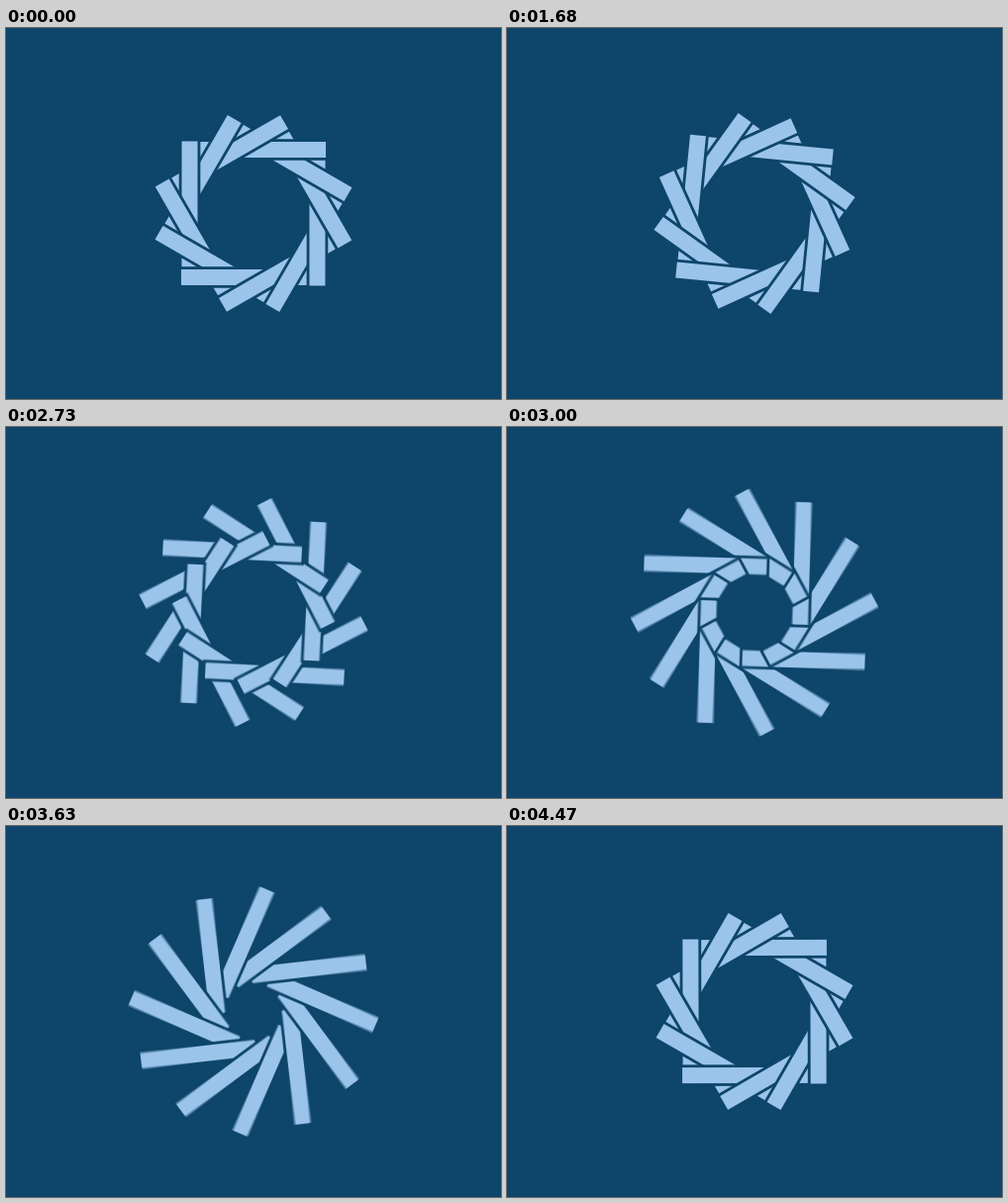
Animation, 500 px wide and 375 px high, one loop 4.5 s. Source, as an HTML page without scripts:

```html
<!DOCTYPE html>
<html lang="en">
<head>
<meta charset="utf-8">
<title>Turning bars</title>
<style>
  @property --drift { syntax: "<angle>"; inherits: true; initial-value: 0deg; }
  @property --flip { syntax: "<number>"; inherits: true; initial-value: 0; }

  html, body { margin: 0; height: 100%; overflow: hidden; background: #0e456b; }
  svg { display: block; width: 500px; height: 375px; }
  .ground { fill: #0e456b; }

  /* Each exposure runs slightly ahead of the previous one; blended, they give motion blur. */
  .exposure {
    opacity: calc(1 / var(--n));
    animation: drift 4.5s linear infinite, flip 4.5s linear infinite;
    animation-delay: calc((1 - var(--n)) * 6ms);
  }
  @keyframes drift { to { --drift: 15deg; } }
  @keyframes flip {
    0% { --flip: 0; }
    50% { --flip: 0; animation-timing-function: cubic-bezier(.33333, 0, .66667, 1); }
    100% { --flip: 1; }
  }

  /* A bar shortens and moves outward as it passes the radial pose. */
  .bar {
    --turn: calc(var(--flip) * 180deg);
    --sin: sin(var(--turn));
    --radial: calc(var(--sin) * var(--sin));
    --half: calc(73px - 20.2px * var(--radial));
    x: calc(-1 * var(--half));
    y: -8px;
    width: calc(2 * var(--half));
    height: 16px;
    fill: #9bc4ea;
    stroke: #0e456b;
    stroke-width: 5.6px;
    paint-order: stroke;
    transform-origin: 0 0;
    transform:
      rotate(calc(var(--k) * 30deg + var(--drift) + var(--flip) * 15deg))
      translateY(calc(-64.5px - 8.2px * var(--radial)))
      rotate(var(--turn));
  }
</style>
</head>
<body>
<svg width="500" height="375">
  <defs>
    <clipPath id="right"><rect y="-188" width="250" height="376"/></clipPath>

    <!-- Cyclic overlap: the stacking order breaks on the left, so only the right half is kept. -->
    <g id="side" clip-path="url(#right)">
      <rect class="bar" style="--k:9"/>
      <rect class="bar" style="--k:8"/>
      <rect class="bar" style="--k:7"/>
      <rect class="bar" style="--k:6"/>
      <rect class="bar" style="--k:5"/>
      <rect class="bar" style="--k:4"/>
      <rect class="bar" style="--k:3"/>
      <rect class="bar" style="--k:2"/>
      <rect class="bar" style="--k:1"/>
      <rect class="bar" style="--k:0"/>
      <rect class="bar" style="--k:-1"/>
      <rect class="bar" style="--k:-2"/>
    </g>

    <g id="ring">
      <rect class="ground" x="-250" y="-188" width="500" height="376"/>
      <use href="#side"/>
      <use href="#side" transform="rotate(180)"/>
    </g>
  </defs>

  <g transform="translate(250 187.5)">
    <g class="exposure" style="--n:1"><use href="#ring"/></g>
    <g class="exposure" style="--n:2"><use href="#ring"/></g>
    <g class="exposure" style="--n:3"><use href="#ring"/></g>
    <g class="exposure" style="--n:4"><use href="#ring"/></g>
  </g>
</svg>
</body>
</html>
```
